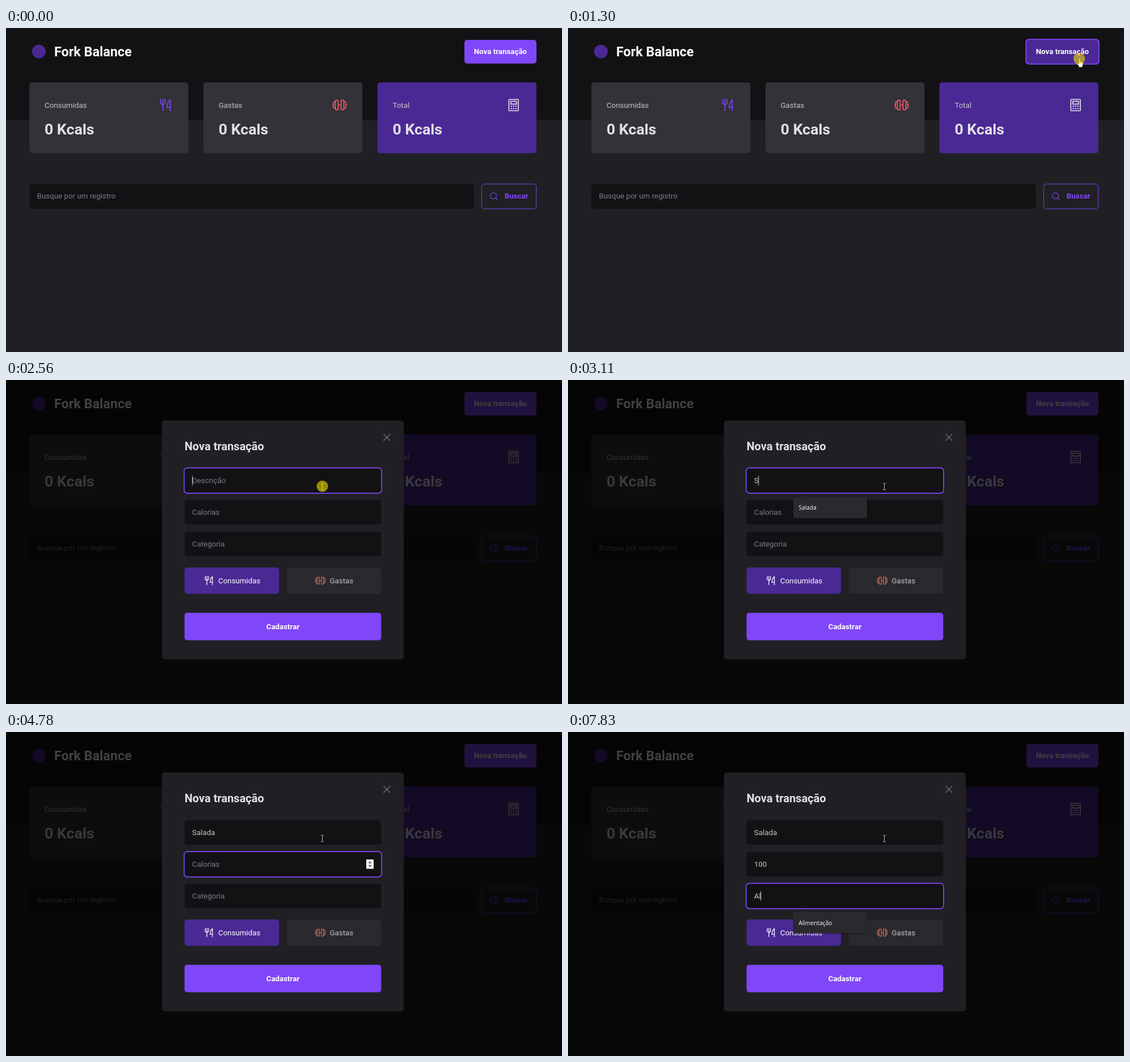
An HTML page that plays this animation: 980 px wide and 572 px high, repeating every 8000 ms.

```html
<!DOCTYPE html>
<html lang="pt">
<head>
<meta charset="utf-8">
<title>Fork Balance</title>
<style>
  html, body { margin: 0; width: 100%; height: 100%; overflow: hidden; background: #202024; }
  svg { display: block; }
  text { font: 13.34px Roboto, sans-serif; fill: #c4c4cc; white-space: pre; }
  .b { font-weight: 700; }
  .icon { fill: none; stroke-width: 16; stroke-linecap: round; stroke-linejoin: round; }
  .popup text { font: 10.2px "Open Sans", sans-serif; fill: #fff; }
</style>
</head>
<body>
<svg id="stage" width="980" height="572" viewBox="0 0 980 572"></svg>
<script>
const PURPLE = '#8047f8', DEEP = '#4b2995', GRAY = '#7c7c8a', LIGHT = '#e1e1e6';
const LOOP = 8000;

const box = (x, y, w, h, fill, more = '') =>
  `<rect x="${x}" y="${y}" width="${w}" height="${h}" rx="5" fill="${fill}" ${more}/>`;
const label = (x, y, str, more = '') => `<text x="${x}" y="${y}" ${more}>${str}</text>`;
const paint = (color, size = 13.34) => `style="fill:${color};font-size:${size}px"`;

const shapes = {
  barbell: `<path d="M108 128h40M8 128h16M232 128h16M56 180H32a8 8 0 0 1-8-8V84a8 8 0 0 1 8-8h24M200 76h24a8 8 0 0 1 8 8v88a8 8 0 0 1-8 8h-24"/>
    <rect x="56" y="48" width="48" height="160" rx="8"/><rect x="152" y="48" width="48" height="160" rx="8"/>`,
  cutlery: '<path d="M84 32v192M52 32l-8 48a40 40 0 0 0 80 0l-8-48M208 168h-56s8-96 56-128v184"/>',
  calculator: `<rect x="48" y="32" width="160" height="192" rx="8"/><rect x="80" y="64" width="96" height="48"/>
    <path stroke-width="24" d="M88 148h0m40 0h0m40 0h0m-80 40h0m40 0h0m40 0h0"/>`,
  search: '<circle cx="116" cy="116" r="84"/><path d="M175.4 175.4 224 224"/>',
  close: '<path d="M56 56l144 144M200 56 56 200"/>'
};
const icon = (name, cx, cy, size, color) =>
  `<g class="icon" stroke="${color}" transform="translate(${cx - size / 2} ${cy - size / 2}) scale(${size / 256})">${shapes[name]}</g>`;

const card = (x, title, fill, name, color) =>
  box(x, 96, 280.2, 125, fill) + label(x + 26.7, 140.6, title) +
  label(x + 26.7, 188.2, '0 Kcals', `class="b" ${paint(LIGHT, 26.7)}`) +
  icon(name, x + 240, 136, 26.7, color);

const fields = [
  { hint: 'Descrição', text: 'Salada', keys: [3110, 3310, 3450, 3510, 3710, 3920], from: 2560, to: 4260 },
  { hint: 'Calorias', text: '100', keys: [5590, 5850, 5980], from: 4250, to: 6440 },
  { hint: 'Categoria', text: 'Al', keys: [7500, 7830], from: 6440, to: LOOP }
];
const fieldY = i => 156 + 56 * i;

const field = (f, i) => {
  const y = fieldY(i);
  return box(314.7, y, 346.6, 43, '#121214') +
    `<rect id="ring${i}" x="313.9" y="${y - .8}" width="348.2" height="44.6" rx="5.8" fill="none" stroke="${PURPLE}" stroke-width="1.7"/>` +
    label(328, y + 26, f.hint, `id="text${i}"`) +
    `<rect id="caret${i}" x="328" y="${y + 13}" width="1" height="17" fill="#c4c4cc"/>`;
};

const popup = (id, y, rows) => {
  const h = 6.3 + 30.7 * rows.length;
  return `<g class="popup" id="${id}" filter="url(#shadow)">
    <path d="M407.500 ${y + .5}l6.500-5 6.500 5z" fill="#29292e"/>
    <rect x="397" y="${y}" width="130" height="${h}" rx="3" fill="#29292e"/>
    ${rows.map((r, i) => label(406.5, y + 22.3 + 30.7 * i, r)).join('')}</g>`;
};

const stage = document.getElementById('stage');
stage.innerHTML = `
  <filter id="shadow" x="-10%" y="-20%" width="120%" height="150%">
    <feDropShadow dx="0" dy="1" stdDeviation="1.2" flood-opacity=".4"/>
  </filter>
  <rect width="980" height="572" fill="#202024"/>
  <rect width="980" height="162.500" fill="#121214"/>
  <circle cx="58" cy="41.500" r="12" fill="${DEEP}"/>
  ${label(85, 49.6, 'Fork Balance', `class="b" ${paint('#fff', 23.35)}`)}
  <rect id="halo" x="806.300" y="19.300" width="130.400" height="45.200" rx="6" fill="${PURPLE}"/>
  ${box(808, 21, 127, 41.7, PURPLE, 'id="open"')}
  ${label(871.4, 46, 'Nova transação', `class="b" text-anchor="middle" ${paint('#fff')}`)}
  ${card(41.2, 'Consumidas', '#323238', 'cutlery', PURPLE)}
  ${card(348, 'Gastas', '#323238', 'barbell', '#f75a68')}
  ${card(654.7, 'Total', DEEP, 'calculator', LIGHT)}
  ${box(41.2, 275, 783.4, 44.5, '#121214')}
  ${label(54.6, 301.3, 'Busque por um registro', paint(GRAY))}
  ${box(838.4, 275.4, 96.2, 43.8, 'none', `stroke="${PURPLE}" stroke-width=".9"`)}
  ${icon('search', 859.8, 297, 16.7, PURPLE)}
  ${label(878.8, 301.3, 'Buscar', `class="b" ${paint(PURPLE)}`)}
  <g id="modal">
    <rect width="980" height="572" opacity=".75"/>
    ${box(274.8, 71.5, 426.4, 421.4, '#202024')}
    ${icon('close', 671.3, 101.3, 20, GRAY)}
    ${label(314.7, 124, 'Nova transação', `class="b" ${paint(LIGHT, 20)}`)}
    ${fields.map(field).join('')}
    <g id="spin"><rect x="635" y="225" width="13" height="16.500" fill="#efefef"/>
      <path d="M638.800 231.500l2.700-3 2.700 3zM638.800 235.200l2.700 3 2.700-3z" fill="#333"/></g>
    ${box(314.7, 331, 166.6, 46.5, DEEP)}
    ${icon('cutlery', 357.5, 354, 20, '#fff')}
    ${label(374, 358.8, 'Consumidas', paint('#fff'))}
    ${box(494.7, 331, 166.6, 46.5, '#29292e')}
    ${icon('barbell', 554, 354, 20, '#d16a55')}
    ${label(570.5, 358.8, 'Gastas')}
    ${box(314.7, 411, 346.6, 48.6, PURPLE)}
    ${label(488, 439.6, 'Cadastrar', `class="b" text-anchor="middle" ${paint('#fff')}`)}
    ${popup('allMeals', 207, ['Salada', 'Corrida', 'Almoço', 'Jantar'])}
    ${popup('meal', 207, ['Salada'])}
    ${popup('category', 318.3, ['Alimentação'])}
  </g>
  <g id="cursor">
    <path id="arrow" d="M0 0v10.800l2.500-2.300 1.600 3.600 1.600-.7-1.600-3.500H7.700z" fill="#fff" stroke="#222" stroke-width=".4"/>
    <path id="hand" d="M-.6 .6q1.100-1.400 2.200 0v4.600l4.200 1q1.400.5 1.200 2l-.8 4.300-.8 2.700H-.2l-1-2.600-3-3.500q-.3-1.600 1.300-1.100l2.300 1.500z" fill="#fff" stroke="#222" stroke-width=".6"/>
    <path id="beam" d="M-2.500-5h2l.5.500.5-.5h2M0-4.500v10M-2.500 6h2l.5-.5.5.5h2" fill="none" stroke="#ccc" stroke-width=".9"/>
    <circle id="click" r="10.200" fill="#f0dc00" opacity=".6"/>
  </g>`;

const el = id => document.getElementById(id);
const show = (id, on) => { el(id).style.display = on ? '' : 'none'; };
const clamp = v => Math.max(0, Math.min(1, v));
const mix = (a, b, p) => a + (b - a) * p;

function pointer(t) {
  if (t < 610) return [952, 401];
  if (t < 1890) {
    const p = clamp(Math.floor((t - 610) / 68) / 5), e = 1 - (1 - p) ** 2;
    return [mix(961, 901, e), mix(106, 54, e)];
  }
  const p = clamp((Math.floor((t - 1890) / 68.3) + 1) / 7), e = p * p * (3 - 2 * p);
  return [mix(901, 557.6, e), mix(54, 187.6, e)];
}

function render(t) {
  const open = t >= 1360;
  const hover = open ? 0 : clamp((t - 780) / 170);
  el('open').setAttribute('fill',
    `rgb(${mix(128, 75, hover)},${mix(71, 41, hover)},${mix(248, 149, hover)})`);
  show('halo', t >= 1210 && t < 2560);
  show('modal', open);

  fields.forEach((f, i) => {
    const typed = f.keys.filter(k => k <= t);
    const last = typed.length ? typed[typed.length - 1] : f.from;
    const focus = t >= f.from && t < f.to;
    const text = el('text' + i), caret = el('caret' + i);
    text.textContent = typed.length ? f.text.slice(0, typed.length) : f.hint;
    text.style.fill = typed.length ? '#c4c4cc' : GRAY;
    show('ring' + i, focus);
    show('caret' + i, focus && Math.floor((t - last) / 530) % 2 === 0);
    caret.setAttribute('x', 328 + (open && typed.length ? text.getComputedTextLength() - .5 : 0));
  });
  show('spin', t >= 4260 && t < 6440);
  show('allMeals', t >= 2630 && t < 3110);
  show('meal', t >= 3110 && t < 4120);
  el('meal').style.opacity = 1 - clamp((t - 3920) / 200);
  show('category', t >= 7630);

  const [x, y] = pointer(t);
  const beam = open && x < 661 && y > 156;
  const hand = !open && x < 935 && y < 62.7;
  show('cursor', t >= 610 || (t >= 200 && t < 270));
  show('beam', beam);
  show('hand', hand);
  show('arrow', !beam && !hand);
  show('click', (t >= 1210 && t < 1360) || (t >= 2560 && t < 2830));
  el('cursor').setAttribute('transform', `translate(${x} ${y})`);
}

const start = performance.now();
function tick() {
  render((performance.now() - start) % LOOP);
  requestAnimationFrame(tick);
}
tick();
</script>
</body>
</html>
```
